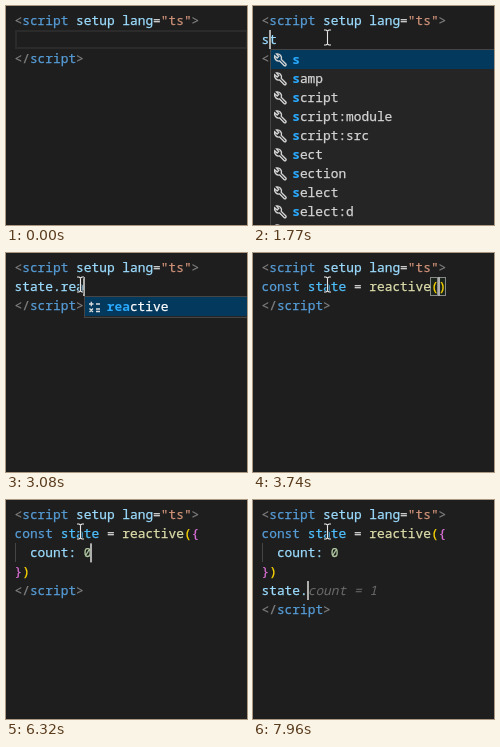
These frames come from a looping animation (241x219 px, 8000 ms). An HTML page with a canvas:

```html
<!DOCTYPE html>
<html lang="en">
<head>
<meta charset="utf-8">
<style>
  html, body { margin: 0; width: 100%; height: 100%; overflow: hidden; background: #1e1e1e; }
  canvas { display: block; width: 241px; height: 219px; }
</style>
</head>
<body>
<canvas id="stage"></canvas>
<script>
const W = 241, H = 219, LOOP = 8000;
const LEFT = 8.5, TOP = 5, CELL = 7.7, ROW = 19, BASELINE = 14;
const FONT = '12.83px "Noto Sans Mono", "DejaVu Sans Mono", monospace';
const C = {
  bg: '#1e1e1e', punct: '#808080', tag: '#569cd6', name: '#9cdcfe', plain: '#d4d4d4',
  string: '#ce9178', constant: '#4fc1ff', call: '#dcdcaa', gold: '#ffd700', orchid: '#da70d6',
  number: '#b5cea8', ghost: '#6a6a6a', match: '#2aaaff'
};

const canvas = document.getElementById('stage');
const ctx = canvas.getContext('2d');
const ratio = window.devicePixelRatio || 1;
canvas.width = W * ratio;
canvas.height = H * ratio;

const colX = col => LEFT + col * CELL;
const rowY = row => TOP + row * ROW;

// A line is a list of [colour, text] tokens.
const OPEN = [['punct', '<'], ['tag', 'script'], ['name', ' setup lang'], ['plain', '='],
  ['string', '"ts"'], ['punct', '>']];
const CLOSE = [['punct', '</'], ['tag', 'script'], ['punct', '>']];
const DECL = [['tag', 'const '], ['constant', 'state'], ['plain', ' = '], ['call', 'reactive'], ['gold', '(']];
const DECL_OPEN = [...DECL, ['orchid', '{']];
const END = [['orchid', '}'], ['gold', ')']];
const COUNT = [['name', '  count:'], ['number', ' 0']];
const word = text => [['name', text]];
const page = (...lines) => [OPEN, ...lines, CLOSE];
const first = text => page(word(text));
const object = (...rest) => page(DECL_OPEN, COUNT, END, ...rest);
const second = text => object(word(text));

const LISTS = {
  s: ['s', 'samp', 'script', 'script:module', 'script:src', 'sect', 'section', 'select', 'select:d', 'small'],
  st: ['style', 'strong', 'script', 'script:module', 'script:src', 'sect', 'section', 'select', 'select:d', 'summary'],
  sta: ['wx-startHCE', 'wx-startRecord', 'uni-startHCE', 'uni-startRecord', 'uni.startRecord',
    'wx-startWifi', 'uni-startWifi', 'fileStat-isFile', 'wx-startLiveStatus', 'uni-startWifi'],
  state: ['wx-startSoterAuthentication', 'wx-startHCE', 'uni-startSoterAuthentication',
    'uni.startSoterAuthentication', 'uni-startHCE', 'wx-setTopBarText', 'fileStat-isDirectory',
    'fileStat-isDirectory', 'fileStat-isFile', 'fileStat-isFile'],
  r: ['reactive', 'ref', 'return', 'readonly', 'require', 'render', 'replace', 'reverse', 'repeat', 'reduce'],
  rea: ['reactive']
};
const menu = (list, query, col, icon) => ({ items: LISTS[list], query, col, icon });
const tool = (list, col) => menu(list, list, col, 'wrench');
const snip = (list, query) => menu(list, query, query.length, 'snippet');
const maths = (list, query) => menu(list, query, 6 + query.length, 'maths');
const type = (lines, row, col, more) => ({ lines, caret: [row, col], on: true, ...more });

const PAREN = [[1, 22], [1, 23]], BRACE = [[1, 23], [1, 24]];

const STEPS = [
  [0, { lines: page([]), caret: [1, 0], on: false, lineBox: true, menu: null, ghost: '', pair: [], error: false, guide: false }],
  [180, { on: true }],
  [600, { on: false }],
  [1160, type(first('s'), 1, 1, { lineBox: false })],
  [1190, { menu: tool('s', 1) }],
  [1770, type(first('st'), 1, 2)],
  [1810, { menu: tool('st', 2) }],
  [1900, type(first('sta'), 1, 3)],
  [1950, { menu: snip('sta', 'sta') }],
  [2140, type(first('stat'), 1, 4)],
  [2180, { menu: snip('state', 'stat') }],
  [2230, type(first('state'), 1, 5)],
  [2280, { menu: snip('state', 'state') }],
  [2560, type(first('state.'), 1, 6, { menu: null })],
  [2890, type(first('state.r'), 1, 7)],
  [2930, { menu: maths('r', 'r') }],
  [2980, type(first('state.re'), 1, 8, { menu: maths('r', 're') })],
  [3030, type(first('state.rea'), 1, 9)],
  [3080, { menu: maths('rea', 'rea') }],
  [3320, type(first('state.reac'), 1, 10)],
  [3360, { menu: maths('rea', 'reac') }],
  [3640, type(page([...DECL, ['gold', ')']]), 1, 23, { menu: null })],
  [3740, { pair: PAREN }],
  [4300, { on: false }],
  [4390, type(page([...DECL_OPEN, ...END]), 1, 24, { pair: [] })],
  [4530, { pair: BRACE }],
  [4770, type(page(DECL_OPEN, [], END), 2, 2, { pair: [] })],
  [4860, { pair: [[1, 23], [3, 0]], error: true }],
  [5190, { ghost: 'count: 0' }],
  [5420, type(object(), 2, 10, { ghost: '' })],
  [5570, { error: false, guide: true }],
  [5850, { on: false }],
  [6320, type(object(), 3, 2, { pair: [] })],
  [6400, { pair: [[1, 22], [3, 1]] }],
  [6650, type(second(''), 4, 0, { pair: [] })],
  [6930, type(second('s'), 4, 1)],
  [6970, { menu: tool('s', 1) }],
  [7300, type(second('st'), 4, 2)],
  [7340, { menu: tool('st', 2) }],
  [7365, type(second('sta'), 4, 3)],
  [7390, { menu: snip('sta', 'sta') }],
  [7580, type(second('stat'), 4, 4, { menu: snip('state', 'stat') })],
  [7630, type(second('state'), 4, 5)],
  [7680, { menu: snip('state', 'state') }],
  [7910, type(second('state.'), 4, 6, { menu: null })],
  [7960, { ghost: 'count = 1' }]
];

function stateAt(t) {
  const state = {};
  let from = [1, 0], moved = 0;
  for (const [time, patch] of STEPS) {
    if (time > t) break;
    if (patch.caret && state.caret) {
      from = state.caret;
      moved = time;
    }
    Object.assign(state, patch);
  }
  const k = Math.min(1, (t - moved) / 50);
  state.caretAt = state.caret.map((v, i) => from[i] + (v - from[i]) * k);
  return state;
}

function rect(color, x, y, w, h) {
  ctx.fillStyle = color;
  ctx.fillRect(x, y, w, h);
}

// A hairline outline gives the glyphs a slightly stronger stem.
function text(str, x, y, color, style = '') {
  ctx.font = style + ' ' + FONT;
  ctx.fillStyle = ctx.strokeStyle = color;
  ctx.lineWidth = style ? 0.01 : 0.25;
  [...str].forEach((ch, i) => {
    ctx.fillText(ch, x + i * CELL, y + BASELINE);
    ctx.strokeText(ch, x + i * CELL, y + BASELINE);
  });
}

function strokePath(d, color, width) {
  ctx.strokeStyle = color;
  ctx.lineWidth = width;
  ctx.stroke(new Path2D(d));
}

const ICONS = {
  wrench: ['M5.4 4 L.8 -.6 A4.2 4.2 0 0 0 -4 -6 L-1.8 -3.6 L-3.4 -2 L-5.8 -4.2 A4.2 4.2 0 0 0 -.8 1 L3.8 5.7 A1.2 1.2 0 0 0 5.4 4', '#d4d4d4', 1.4],
  snippet: ['M-1.5 6 H-5 V-6 H1 L4 -3 V-1 M1 -6 V-3 H4 M1.5 0 H.5 V2 L-.5 3 L.5 4 V6 H1.5 M3.5 0 H4.5 V2 L5.5 3 L4.5 4 V6 H3.5', '#d4d4d4', 1.1],
  maths: ['M-5.5 -3 H-1 M-3.2 -5.2 V-.8 M1.5 -3 H5.5 M-5 1.5 L-1.5 5 M-1.5 1.5 L-5 5 M1.5 2 H5.5 M1.5 4.5 H5.5', '#dddddd', 1.3]
};

// Matches the longest run of the query first, then the rest after it.
function matched(item, query) {
  const hits = new Set(), lower = item.toLowerCase();
  let at = 0;
  while (query) {
    let n = query.length;
    while (n && lower.indexOf(query.slice(0, n), at) < 0) n--;
    if (!n) break;
    const start = lower.indexOf(query.slice(0, n), at);
    for (let i = 0; i < n; i++) hits.add(start + i);
    at = start + n;
    query = query.slice(n);
  }
  return hits;
}

function drawMenu({ items, query, col, icon }, row) {
  const x = Math.round(colX(col) + 0.4), y = rowY(row + 1);
  const height = items.length > 1 ? H : ROW + 3;
  rect('#454545', x, y, 430, height);
  rect('#252526', x + 1, y + 1, 428, height - 2);
  rect('#04395e', x + 1, y + 1, 428, ROW);
  items.forEach((item, i) => {
    const top = y + 1 + i * ROW, hits = matched(item, query);
    ctx.save();
    ctx.translate(x + 10.5, top + 10);
    strokePath(...ICONS[icon]);
    ctx.restore();
    [...item].forEach((ch, j) => {
      const hit = hits.has(j);
      text(ch, colX(col) + 23 + j * CELL, top, hit ? C.match : i ? C.plain : '#ffffff', hit ? 'bold' : '');
    });
  });
}

function drawPointer(t) {
  if (t < 180) return;
  const k = 1 - (1 - Math.min(1, (t - 140) / 260)) ** 2;
  ctx.save();
  ctx.translate(74.5 * k, 108 - 76.5 * k);
  const beam = 'M-3.5 -7.5 H-1.5 L0 -6.5 L1.5 -7.5 H3.5 M0 -6.5 V6.5 M-3.5 7.5 H-1.5 L0 6.5 L1.5 7.5 H3.5';
  strokePath(beam, '#202020', 2.4);
  strokePath(beam, '#e8e8e8', 1.1);
  ctx.restore();
}

function draw(t) {
  const s = stateAt(t);
  ctx.setTransform(ratio, 0, 0, ratio, 0, 0);
  rect(C.bg, 0, 0, W, H);

  if (s.lineBox) {
    rect('#2b2b2b', 9, rowY(1), W, ROW);
    rect(C.bg, 11, rowY(1) + 2, W - 12, ROW - 4);
  }
  if (s.error) rect('#6b1d1d', 9, rowY(2), 14.5, ROW);
  if (s.guide) rect('#454545', 9, rowY(2), 1, ROW);

  for (const [row, col] of s.pair) {
    const x = Math.floor(colX(col)) + 0.5, y = rowY(row) + 0.5;
    rect('rgba(0, 100, 0, 0.1)', x, y, CELL, ROW - 1);
    ctx.strokeStyle = '#888888';
    ctx.lineWidth = 1;
    ctx.strokeRect(x, y, 7, ROW - 1);
  }
  s.lines.forEach((line, row) => {
    let col = 0;
    for (const [color, str] of line) {
      text(str, colX(col), rowY(row), C[color]);
      col += str.length;
    }
  });
  if (s.ghost) text(s.ghost, colX(s.caret[1]), rowY(s.caret[0]), C.ghost, 'italic');
  if (s.menu) drawMenu(s.menu, s.caret[0]);
  if (s.on) rect('#aeafad', Math.floor(colX(s.caretAt[1]) - 0.1), rowY(s.caretAt[0]), 2, ROW);
  drawPointer(t);
}

const start = performance.now();
function tick() {
  draw((performance.now() - start) % LOOP);
  requestAnimationFrame(tick);
}
tick();
</script>
</body>
</html>
```
